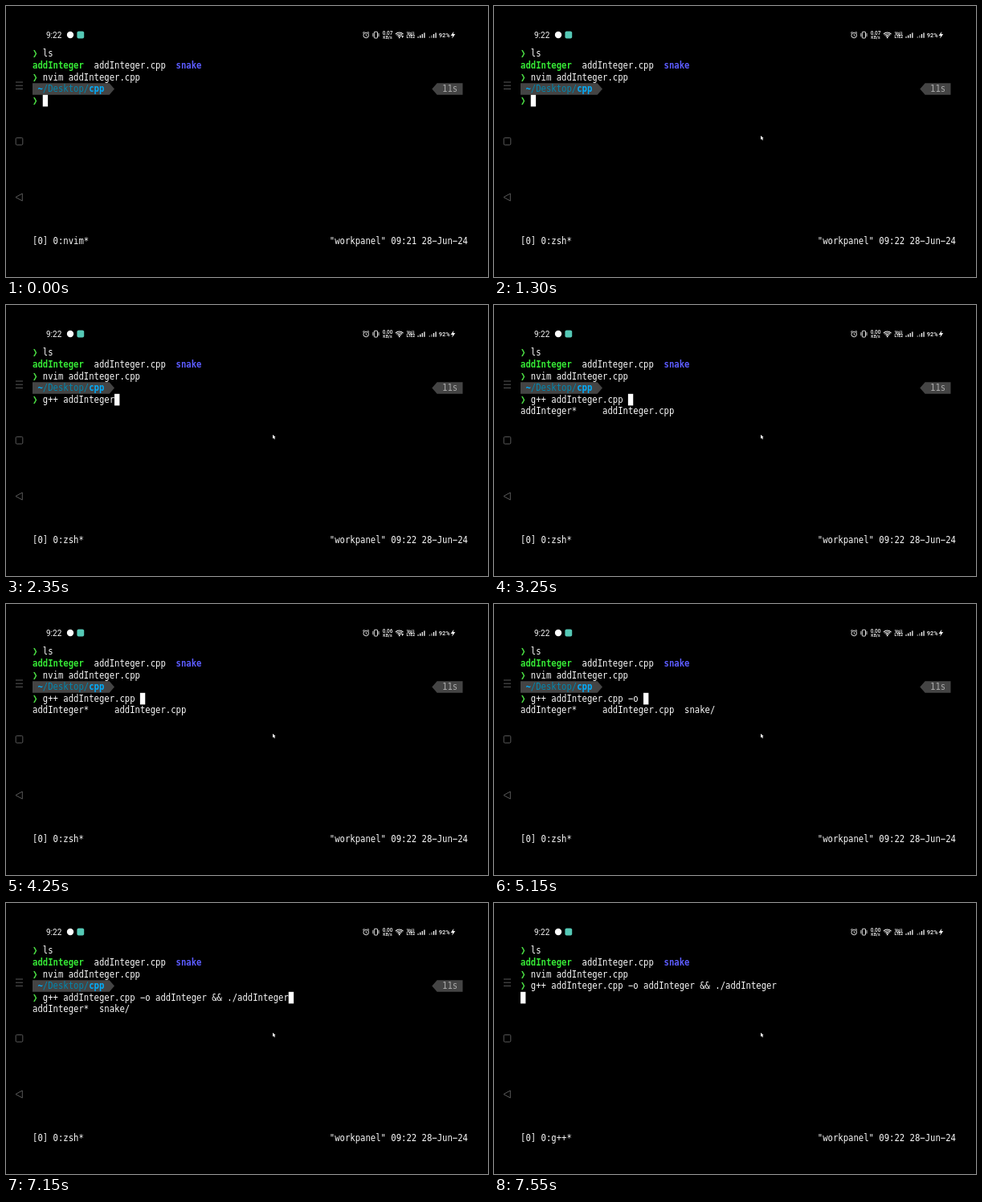
Recreate the animation shown at these times as an HTML page with a canvas. Size 600x338 px, loop 8 s.

```html
<!DOCTYPE html>
<html lang="en">
<head>
<meta charset="utf-8">
<title>Terminal session</title>
<style>
  html, body { margin: 0; width: 100%; height: 100%; overflow: hidden; background: #000; }
  canvas { display: block; width: 600px; height: 338px; }
</style>
</head>
<body>
<canvas id="stage"></canvas>
<script>
const W = 600, H = 338, LOOP = 8000;
const CELL_W = 6.375, CELL_H = 14.58, LEFT = 33, TOP = 52.5, BASE = 10.9;
const ASPECT = 1.18; // the terminal's pixels are taller than wide
const MONO = '10.58px "DejaVu Sans Mono", monospace';
const WHITE = '#fafafa', PROMPT = '#4be044', SEGMENT = '#444';

const canvas = document.getElementById('stage');
const ctx = canvas.getContext('2d');
const ratio = window.devicePixelRatio || 1;
canvas.width = W * ratio;
canvas.height = H * ratio;

// Step tracks: [start time, value]
const typed = [
  [0, ''], [950, 'c'], [1300, ''], [1550, 'g'], [1900, 'g+'], [1950, 'g++'],
  [2050, 'g++ '], [2150, 'g++ a'], [2200, 'g++ ad'], [2250, 'g++ add'],
  [2350, 'g++ addInteger'], [2900, 'g++ addInteger.cpp'], [3250, 'g++ addInteger.cpp '],
  [4700, 'g++ addInteger.cpp -'], [4750, 'g++ addInteger.cpp -o'],
  [4850, 'g++ addInteger.cpp -o '], [5200, 'g++ addInteger.cpp -o add'],
  [5300, 'g++ addInteger.cpp -o addInteger'], [5650, 'g++ addInteger.cpp -o addInteger '],
  [6250, 'g++ addInteger.cpp -o addInteger &'], [6300, 'g++ addInteger.cpp -o addInteger &&'],
  [6450, 'g++ addInteger.cpp -o addInteger && '], [6650, 'g++ addInteger.cpp -o addInteger && .'],
  [6750, 'g++ addInteger.cpp -o addInteger && ./'],
  [7150, 'g++ addInteger.cpp -o addInteger && ./addInteger']
];
const listing = [
  [0, ''], [2550, 'addInteger*     addInteger.cpp'],
  [5100, 'addInteger*     addInteger.cpp  snake/'],
  [6900, 'addInteger*  snake/'], [7500, '']
];
const job = [[0, 'nvim'], [50, 'zsh'], [7550, 'g++']];
const clock = [[0, '09:21'], [50, '09:22']];
const speed = [[0, '0.07'], [1350, '0.00'], [3300, '0.06'], [5150, '0.00']];
const traffic = [[0, true], [600, false], [3600, true], [5150, false]];
const ENTER = 7500;

function at(track, t) {
  let value = track[0][1];
  for (const [start, v] of track) if (t >= start) value = v;
  return value;
}

const colX = c => LEFT + c * CELL_W;
const rowY = r => TOP + r * CELL_H;

// Text on the terminal grid, with wide hyphens
function put(text, col, row, color = WHITE, bold = false) {
  ctx.save();
  ctx.translate(colX(col), rowY(row) + BASE);
  ctx.scale(1, ASPECT);
  ctx.font = (bold ? 'bold ' : '') + MONO;
  ctx.fillStyle = color;
  ctx.textAlign = 'left';
  [...text.replaceAll('-', '\u2212')].forEach((ch, i) => {
    if (ch !== ' ') ctx.fillText(ch, i * CELL_W, 0);
  });
  ctx.restore();
}

function shape(points, color) {
  ctx.fillStyle = color;
  ctx.beginPath();
  points.forEach(([x, y]) => ctx.lineTo(x, y));
  ctx.closePath();
  ctx.fill();
}

function line(points, color, width, close = false) {
  ctx.strokeStyle = color;
  ctx.lineWidth = width;
  ctx.beginPath();
  points.forEach(([x, y]) => ctx.lineTo(x, y));
  if (close) ctx.closePath();
  ctx.stroke();
}

function arc(x, y, r, from = 0, to = Math.PI * 2) {
  ctx.beginPath();
  ctx.arc(x, y, r, from, to);
}

function label(text, x, y, size, weight = 400, align = 'left') {
  ctx.font = `${weight} ${size}px Roboto, sans-serif`;
  ctx.textAlign = align;
  ctx.fillStyle = WHITE;
  ctx.fillText(text, x, y);
}

function drawSignal(x, dimBars) {
  for (let i = 0; i < 4; i++) {
    const h = 1.6 + i * 1.6;
    ctx.fillStyle = i < dimBars ? '#8c8c8c' : WHITE;
    ctx.fillRect(x + i * 2.6, 39.8 - h, 1.3, h);
  }
}

function drawStatusBar(t) {
  label('9:22', 50, 39.6, 10);
  ctx.fillStyle = '#fff';
  arc(80, 36, 4.2);
  ctx.fill();
  ctx.fillStyle = '#55c9b6';
  ctx.beginPath();
  ctx.roundRect(88.4, 31.6, 8.8, 8.8, 2);
  ctx.fill();

  // Alarm
  ctx.strokeStyle = WHITE;
  ctx.lineWidth = 0.9;
  arc(448.2, 36.5, 3.3);
  ctx.stroke();
  line([[448.2, 34.6], [448.2, 36.8], [449.6, 37.4]], WHITE, 0.8);
  line([[444.3, 33.7], [446.2, 32]], WHITE, 0.9);
  line([[450.2, 32], [452.1, 33.7]], WHITE, 0.9);

  // Vibration
  ctx.beginPath();
  ctx.roundRect(458.3, 32.2, 4.2, 7.8, 0.8);
  ctx.stroke();
  for (const side of [-1, 1]) {
    line([[460.4 + side * 3.6, 34], [460.4 + side * 3.6, 38.2]], WHITE, 0.8);
  }

  label(at(speed, t), 475, 35.6, 6.4, 500, 'center');
  label('KB/s', 475, 40.6, 5.2, 500, 'center');

  // Wi-Fi
  ctx.strokeStyle = WHITE;
  ctx.lineWidth = 1.1;
  for (const r of [2.6, 4.6, 6.6]) {
    arc(489.7, 39.6, r, -Math.PI * 0.76, -Math.PI * 0.24);
    ctx.stroke();
  }
  ctx.fillStyle = WHITE;
  arc(489.7, 39.2, 1);
  ctx.fill();
  if (at(traffic, t)) shape([[492.2, 37.2], [495, 37.2], [493.6, 40]], WHITE);

  label('Vo))', 503.8, 35.7, 5, 700, 'center');
  label('LTE2', 503.8, 40.3, 4.8, 700, 'center');
  drawSignal(512.4, 0);
  drawSignal(526.6, 2);
  label('92%', 538.8, 38.8, 7.4, 500);
  shape([[557.4, 31.8], [553.6, 36.9], [556, 36.9], [555.2, 40.4], [559.2, 35.1], [556.7, 35.1]], WHITE);
}

function drawNavigation() {
  const gray = '#646464';
  for (const y of [95, 99.2, 103.4]) line([[12, y], [21, y]], gray, 0.9);
  ctx.lineWidth = 0.9;
  ctx.beginPath();
  ctx.roundRect(12.2, 164.4, 8.6, 8.8, 1.3);
  ctx.stroke();
  line([[12, 238.5], [20.3, 233.9], [20.3, 243.1]], gray, 0.9, true);
}

function drawPathBar() {
  const top = rowY(3), bottom = rowY(4), mid = (top + bottom) / 2;
  shape([[LEFT, top], [colX(15), top], [colX(16), mid], [colX(15), bottom], [LEFT, bottom]], SEGMENT);
  shape([[colX(84), top], [colX(79), top], [colX(78), mid], [colX(79), bottom], [colX(84), bottom]], SEGMENT);
  put('~', 1, 3, '#00afff', true);
  put('/Desktop/', 2, 3, '#0087af');
  put('cpp', 11, 3, '#00afff', true);
  put('11s', 80, 3, '#a8a8a8');
}

function drawCursor(col, row) {
  ctx.fillStyle = '#fff';
  ctx.fillRect(colX(col), rowY(row), CELL_W, CELL_H);
}

function drawTerminal(t) {
  const command = at(typed, t), running = t >= ENTER, row = running ? 3 : 4;
  put('❯', 0, 0, PROMPT);
  put('ls', 2, 0);
  put('addInteger', 0, 1, '#36e936', true);
  put('addInteger.cpp', 12, 1);
  put('snake', 28, 1, '#5c5cff', true);
  put('❯', 0, 2, PROMPT);
  put('nvim addInteger.cpp', 2, 2);
  if (!running) drawPathBar();
  put('❯', 0, row, PROMPT);
  put(command, 2, row);
  put(at(listing, t), 0, 5);
  if (running) drawCursor(0, 4);
  else drawCursor(2 + command.length, 4);
  put(`[0] 0:${at(job, t)}*`, 0, 16);
  put(`"workpanel" ${at(clock, t)} 28-Jun-24`, 58, 16);
}

function drawPointer(t) {
  const steps = Math.floor((t - 350) / 50) + 1;
  if (steps < 1) return;
  ctx.globalAlpha = Math.min(1, steps / 3);
  shape([[332, 161.7], [332, 166.7], [333.2, 165.7], [334.1, 167.4], [335, 166.9], [334.2, 165.3], [335.6, 165.1]], '#fff');
  ctx.globalAlpha = 1;
}

function draw(now) {
  const t = now % LOOP;
  ctx.setTransform(ratio, 0, 0, ratio, 0, 0);
  ctx.fillStyle = '#000';
  ctx.fillRect(0, 0, W, H);
  drawStatusBar(t);
  drawNavigation();
  drawTerminal(t);
  drawPointer(t);
}

const begin = performance.now();
function tick() {
  draw(performance.now() - begin);
  requestAnimationFrame(tick);
}
tick();
</script>
</body>
</html>
```
